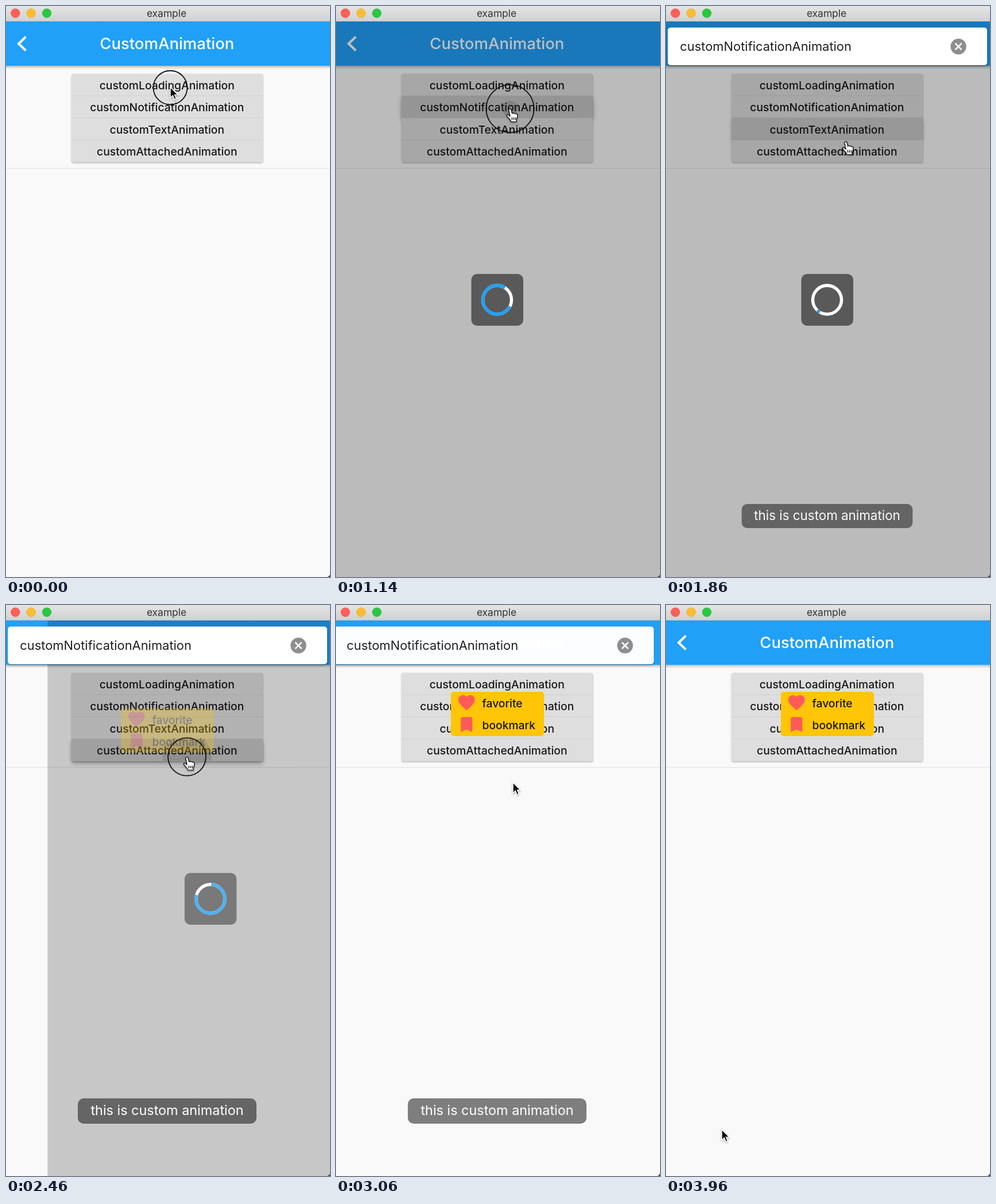
An HTML page for the animation above (4.02 s loop, 564 px wide and 993 px high).

```html
<!DOCTYPE html>
<html lang="en">
<head>
<meta charset="utf-8">
<title>example</title>
<style>
  html, body { margin: 0; width: 100%; height: 100%; overflow: hidden; background: #f9f9f9; }
  svg { display: block; width: 564px; height: 993px; font-family: Inter, "Open Sans", sans-serif; }
  .label { font-size: 19.3px; font-weight: 500; fill: #171717; }
  .mid { text-anchor: middle; }
</style>
</head>
<body>
<svg viewBox="0 0 564 993">
  <defs>
    <linearGradient id="barFill" x2="0" y2="1">
      <stop offset="0" stop-color="#e4e4e4"/><stop offset="1" stop-color="#d0d0d0"/>
    </linearGradient>
    <linearGradient id="headShade" x2="0" y2="1">
      <stop offset="0" stop-opacity=".23"/><stop offset="1" stop-opacity="0"/>
    </linearGradient>
    <filter id="soft" x="-10%" y="-30%" width="120%" height="180%">
      <feDropShadow dx="0" dy="1.5" stdDeviation="1.5" flood-opacity=".35"/>
    </filter>
    <filter id="raised" x="-10%" y="-60%" width="120%" height="260%">
      <feDropShadow dx="0" dy="4" stdDeviation="4" flood-opacity=".3"/>
    </filter>
    <clipPath id="rowClip"><rect id="rowClipRect" x="114.5" width="332.5" height="38.3" rx="2"/></clipPath>
  </defs>

  <rect width="564" height="993" fill="#f9f9f9"/>
  <rect y="104" width="564" height="6" fill="url(#headShade)"/>
  <rect y="27" width="564" height="77" fill="#20a0f6"/>
  <path d="M34.5 53.5L22 65.5L34.5 77.5" fill="none" stroke="#fff" stroke-width="4"/>
  <text class="mid" x="280.3" y="75" font-size="27.5" font-weight="500" fill="#fff">CustomAnimation</text>
  <path d="M0 282.3H564" stroke="#dfdfdf"/>

  <rect id="lift" x="114.5" width="332.5" height="38.3" rx="2" fill="#dedede" filter="url(#raised)"/>
  <rect x="114.5" y="118" width="332.5" height="153.3" rx="3" fill="#dedede" filter="url(#soft)"/>
  <g id="separators" stroke="#d0d0d0"></g>
  <rect id="press" x="114.5" width="332.5" height="38.3" rx="2"/>
  <g clip-path="url(#rowClip)"><circle id="ripple"/></g>
  <g id="labels" class="label mid"></g>

  <g id="loading">
    <rect x="-3" y="27" width="570" height="966" fill-opacity=".25"/>
    <rect x="235.5" y="466" width="90.5" height="90" rx="10" fill-opacity=".52"/>
    <g fill="none" stroke-width="5.4">
      <circle cx="280.5" cy="511" r="25" stroke="#fff"/>
      <path id="arc" stroke="#20a0f6" stroke-linecap="square"/>
    </g>
  </g>

  <g id="popup">
    <rect x="200" y="151" width="162" height="77" rx="5" fill="#ffc506"/>
    <g fill="#ff5b59">
      <path transform="translate(210 152.5) scale(1.44)" d="M12 21.35l-1.45-1.32C5.4 15.36 2 12.28 2 8.5 2 5.42 4.42 3 7.5 3c1.74 0 3.41.81 4.5 2.09C13.09 3.81 14.76 3 16.5 3 19.58 3 22 5.42 22 8.5c0 3.78-3.4 6.86-8.55 11.54z"/>
      <path transform="translate(210 190.7) scale(1.44)" d="M17 3H7c-1.1 0-2 .9-2 2V21l7-3 7 3V5c0-1.1-.9-2-2-2z"/>
    </g>
    <g class="label"><text x="254.5" y="178">favorite</text><text x="254.5" y="216.3">bookmark</text></g>
  </g>

  <g id="notice">
    <rect x="3" y="37.5" width="556" height="65.5" rx="5" fill="#fff" filter="url(#soft)"/>
    <text x="24.3" y="78" font-size="21.9" fill="#1f1f1f">customNotificationAnimation</text>
    <circle cx="509" cy="70.5" r="13.7" fill="#8e8e8e"/>
    <path d="M503.5 65l11 11m0-11l-11 11" stroke="#fff" stroke-width="2.6"/>
  </g>

  <g id="toast">
    <rect x="-155.5" y="-22" width="311" height="44" rx="10" fill-opacity=".495"/>
    <text class="mid" y="7" font-size="23.4" fill="#fff">this is custom animation</text>
  </g>

  <rect width="564" height="27" fill="url(#barFill)"/>
  <path d="M0 26.5H564" stroke="#bcbcbc"/>
  <circle cx="16.3" cy="12.5" r="7.8" fill="#ff5f57" stroke="#e2463f" stroke-width=".6"/>
  <circle cx="43.7" cy="12.5" r="7.8" fill="#ffbd2e" stroke="#e0a028" stroke-width=".6"/>
  <circle cx="71" cy="12.5" r="7.8" fill="#28c940" stroke="#1eae33" stroke-width=".6"/>
  <text class="mid" x="279.5" y="19" font-size="17.4" fill="#333">example</text>
  <path d="M564 988Q563 992 559 993H564Z" fill="#444"/>

  <circle id="ring" fill="none" stroke="#111" stroke-width="1.8"/>
  <g id="cursor" filter="url(#soft)">
    <path id="arrow" d="M0 0V18.5L4.3 14.6L7.2 21.3L10.4 20L7.6 13.4H13.3Z" fill="#0c0c0c" stroke="#fff" stroke-width="1.4"/>
    <path id="hand" d="M-2.2 .8C-2.2-1.8 1.4-1.9 2 .5L3.6 7C4.3 5.4 6.4 5.6 7 7.2C7.9 6.1 9.7 6.4 10.2 7.9C11.4 7.2 13 8 13 9.8C13.2 13.5 12.2 15.5 11 17.5V21.3H1.8C1 17.8-2.2 15.5-5.4 11.6C-6.6 9.8-4.2 8.5-2.6 9.8L.1 11.9Z M3.4 13.6V18M6.3 13.6V18M9.2 13.6V18" fill="#fff" stroke="#111" stroke-width="1.3" stroke-linejoin="round"/>
  </g>
</svg>

<script>
const LOOP = 4020, STEP = 60, FADE = 197;
const ROW_TOP = 118, ROW_H = 38.3;
const el = Object.fromEntries([...document.querySelectorAll('[id]')].map(e => [e.id, e]));
const set = (e, attrs) => { for (const k in attrs) e.setAttribute(k, attrs[k]); };
const clamp = v => Math.min(1, Math.max(0, v));

['Loading', 'Notification', 'Text', 'Attached'].forEach((name, i) => {
  const y = ROW_TOP + i * ROW_H;
  el.labels.innerHTML += `<text x="280.3" y="${y + 27}">custom${name}Animation</text>`;
  if (i) el.separators.innerHTML += `<path d="M115 ${y - .3}H447"/>`;
});

// Each click: row, press time, release time, position
const clicks = [
  { row: 0, down: 530, up: 620, x: 286.5, y: 142 },
  { row: 1, down: 1090, up: 1230, x: 303, y: 178.5 },
  { row: 2, down: 1600, up: 1710, x: 309, y: 215 },
  { row: 3, down: 2330, up: 2440, x: 315, y: 264 }
];

// Pointer path: time, x, y
const route = [
  [0, 286, 141], [540, 287, 143], [780, 287, 143], [1020, 301, 176], [1140, 303, 180],
  [1320, 304, 186], [1560, 309, 214], [1740, 310, 217], [1860, 313, 237], [2160, 315, 264],
  [2640, 315, 267], [2880, 314, 272], [3180, 304, 333], [3360, 270, 380], [3480, 237, 440],
  [3600, 150, 700], [3720, 96, 910], [3780, 97, 911], [3900, 97, 911], [3960, 97, 912]
];

function pointerAt(t) {
  const i = route.findIndex(p => p[0] > t);
  if (i < 0) return route[route.length - 1].slice(1);
  const a = route[i - 1], b = route[i], k = (t - a[0]) / (b[0] - a[0]);
  return [a[1] + (b[1] - a[1]) * k, a[2] + (b[2] - a[2]) * k];
}

// Decelerating entry, played backwards on exit
function presence(t, start, end) {
  const k = Math.min(clamp((t - start) / FADE), 1 - clamp((t - end) / FADE));
  return 1 - (1 - k) ** 2;
}

// Cubic bezier (.4, 0, .2, 1)
function fastOutSlowIn(x) {
  let lo = 0, hi = 1;
  for (let i = 0; i < 20; i++) {
    const s = (lo + hi) / 2, q = 1 - s;
    if (1.2 * q * q * s + .6 * q * s * s + s ** 3 < x) lo = s; else hi = s;
  }
  return lo * lo * (3 - 2 * lo);
}

function spinnerPath(ms) {
  const cycle = Math.floor(ms / 1333), phase = (ms / 1333) % 1;
  const head = fastOutSlowIn(clamp(phase * 2)) * 270;
  const tail = fastOutSlowIn(clamp(phase * 2 - 1)) * 270;
  const from = tail + ms / 2222 * 360 + phase * 90 + cycle * 360;
  const sweep = Math.max(head - tail, .5);
  const point = deg => {
    const a = deg * Math.PI / 180;
    return `${280.5 + 25 * Math.sin(a)} ${511 - 25 * Math.cos(a)}`;
  };
  return `M${point(from)}A25 25 0 ${sweep > 180 ? 1 : 0} 1 ${point(from + sweep)}`;
}

function drawPress(t) {
  const c = clicks.find(c => t >= c.down && t < c.up + 250);
  const fade = c ? clamp(1 - (t - c.up) / 250) : 0;
  const y = ROW_TOP + (c ? c.row : 0) * ROW_H;
  set(el.lift, { y, opacity: Math.sqrt(fade) });
  set(el.press, { y, opacity: .105 * fade });
  set(el.rowClipRect, { y });
  if (c) {
    const r = 10 + .08 * (Math.min(t, c.up) - c.down) + 1.2 * Math.max(0, t - c.up);
    set(el.ripple, { cx: c.x, cy: c.y, r });
  }
  set(el.ripple, { opacity: .12 * fade });
}

function drawRing(t) {
  const c = clicks.find(c => t >= c.down && t < c.up + 95);
  let r = c ? 41.7 * clamp(1 - (t - c.up) / 95) : 0;
  const [x, y] = c ? [c.x, c.y] : [286, 142];
  if (t < 120) r = 29.5 - t * .25;
  set(el.ring, { cx: x, cy: y, r, opacity: r ? 1 : 0 });
}

function draw(t) {
  drawPress(t);

  const load = presence(t, 641, 2388);
  set(el.loading, { transform: `translate(${564 * (1 - load)} 0)`, opacity: load ** 1.6 });
  set(el.arc, { d: spinnerPath(Math.max(0, 70 + (t - 720) * 1.11)) });

  const note = presence(t, 1250, 3040);
  set(el.notice, { transform: `translate(${-564 * (1 - note)} 0)`, opacity: note });

  const text = t < 3780 ? presence(t, 1712, 3605) : 0;
  set(el.toast, {
    transform: `translate(280.5 ${880 + 114 * (1 - text)}) scale(${.3 + .7 * text})`,
    opacity: text
  });

  const menu = presence(t, 2430, LOOP);
  set(el.popup, { transform: `translate(0 ${40 * (1 - menu)})`, opacity: menu });

  drawRing(t);
  const [x, y] = pointerAt(t);
  const overRow = t >= 540 && y < 275;
  set(el.cursor, { transform: `translate(${x} ${y})` });
  set(el.arrow, { opacity: overRow ? 0 : 1 });
  set(el.hand, { opacity: overRow ? 1 : 0 });
}

function tick() {
  draw(Math.floor(performance.now() / STEP + .05) * STEP % LOOP);
  requestAnimationFrame(tick);
}
tick();
</script>
</body>
</html>
```
